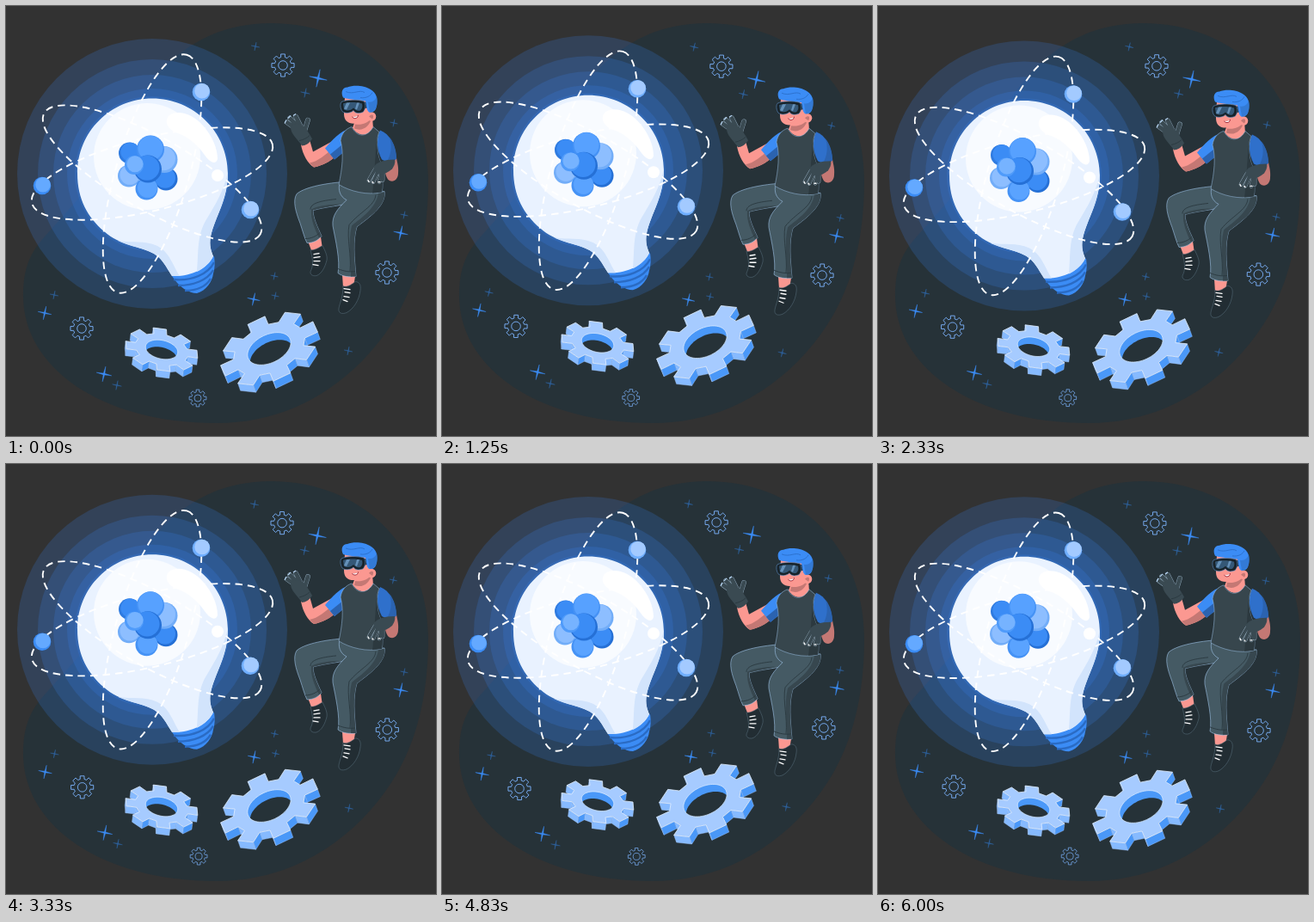
Recreate the animation shown at these times as an HTML page. Size 500x500 px, loop 6.04 s.

```html
<!DOCTYPE html>
<html lang="en">
<head>
<meta charset="utf-8">
<title>Floating idea</title>
<style>
  html, body { margin: 0; width: 100%; height: 100%; overflow: hidden; background: #323232; }
  svg { display: block; width: 100%; height: 100%; }
  .halo { fill: #3a84ee; fill-opacity: .2; }
  .orbits { fill: none; stroke: #fff; stroke-width: 1.9; stroke-dasharray: 8.5 6; }
  .glove { fill: #3a4a52; }
  .vest { fill: #37464d; stroke: #9fc4ea; stroke-width: .5; }
  .shoe { fill: #222d33; stroke: #5d7482; stroke-width: .5; }
  .finger { fill: none; stroke-linecap: round; stroke-linejoin: round; }
  .pants { fill: #455a64; stroke: #9fc4ea; stroke-width: .6; }
  .shade { fill: #37474f; }
  .skin { fill: #fb9891; }
  .tan { fill: #c47874; }
  .blue { fill: #3b8cf5; }
  .deep { fill: #2b63b0; }
  .line { fill: none; stroke: #2b3940; stroke-width: .9; }
  .lace { fill: none; stroke: #fff; stroke-width: 1.3; stroke-linecap: round; }
</style>
</head>
<body>
<svg viewBox="0 0 500 500">
  <path fill="#263238" d="M308 20C415 20 491 98 491 202C491 304 460 366 414 413C367 460 310 485 245 485C110 485 20 420 20 337C20 302 30 285 45 268C75 235 95 215 120 170C150 105 200 20 308 20Z"/>
  <g id="icons"></g>

  <g id="bulb">
    <g class="halo">
      <circle cx="170" cy="195" r="157"/><circle cx="170" cy="195" r="133"/>
      <circle cx="170" cy="195" r="115"/><circle cx="170" cy="195" r="99"/>
      <circle cx="170" cy="195" r="90"/>
    </g>
    <path class="blue" d="M193 314L242 291C243 298 243 305 241 311C240 320 233 331 222 334C213 334 201 327 193 314Z"/>
    <g fill="none" stroke="#2a6bc4" stroke-width="2.4">
      <path d="M195 318C216 320 235 312 242 298"/><path d="M200 325C218 325 234 319 241 307"/>
      <path d="M208 331C220 331 232 327 238 317"/>
    </g>
    <path fill="#e9f2ff" d="M170 107.5C218 107.5 258 146 258 195C258 226 243 245 238 268C236 279 239 286 241 291C234 306 214 315 193 314C186 303 182 294 172 288C156 279 133 279 114 262C95 246 83 224 83 195C83 146 122 107.5 170 107.5Z"/>
    <path fill="#d2e4fc" d="M258 192C258 226 243 245 238 268C236 279 239 286 241 291C237 299 230 305 222 309C224 285 222 268 232 250C244 230 254 214 258 192Z"/>
    <path fill="#d2e4fc" d="M130 273C148 276 160 272 176 279C190 286 193 300 202 314L193 314C186 303 182 294 172 288C160 281 144 280 130 273Z"/>
    <circle cx="164" cy="175" r="62" fill="#f8fbff"/>
    <path fill="#fff" d="M190 127C200 120 218 126 229 139C240 151 246 166 246 178C244 185 238 182 233 176C226 166 215 153 200 148C188 144 183 134 190 127Z"/>
    <circle cx="246" cy="197" r="7" fill="#fff"/>
    <g class="orbits">
      <ellipse cx="170" cy="195" rx="144" ry="42.5" transform="rotate(-73.8 170 195)"/>
      <ellipse cx="170" cy="195" rx="144" ry="42.5" transform="rotate(29.3 170 195)"/>
      <ellipse cx="170" cy="195" rx="144" ry="42.5" transform="rotate(-13.8 170 195)"/>
    </g>
    <g id="balls"></g>
  </g>

  <g id="gears"></g>

  <g id="man">
    <!-- far leg -->
    <path class="skin" d="M351 274L366 269L368 283L356 287Z"/>
    <path class="shoe" d="M354 284C359 285 364 281 368 279C371 285 374 291 373 296C371 304 367 312 361 314C356 315 352 312 355 307C358 300 356 292 354 284Z"/>
    <path class="lace" d="M358 289L364 288M358 293L365 292M358 297L365 297M357 301L363 302"/>
    <path class="pants" d="M392 205C367 207 346 212 338 219C333 227 337 240 342 253C345 262 347 270 350 276C357 276 363 273 367 268C362 257 357 247 357 238C372 234 390 232 408 229Z"/>
    <path class="shade" d="M390 231C378 231 364 232 355 237C354 248 359 260 364 270L367 268C362 257 357 247 357 238C368 235 378 234 390 231Z"/>
    <path class="line" d="M348 271C355 271 361 268 365 264M354 237C354 230 365 227 384 225"/>
    <!-- near leg -->
    <path class="skin" d="M391 313L406 315L404 327L392 328Z"/>
    <path class="shoe" d="M392 326C397 328 402 324 406 321C411 321 413 325 412 331C411 342 404 353 396 357C391 359 386 358 387 352C388 346 392 339 392 326Z"/>
    <path class="lace" d="M393 329L400 330M394 333L400 334M393 338L399 339M392 342L397 344"/>
    <path class="pants" d="M388 206C402 217 424 218 440 216C442 231 427 243 408 257C403 273 405 293 407 315C399 316 391 315 386 311C389 297 383 272 380 256C379 244 385 237 396 226C388 222 386 214 388 206Z"/>
    <path class="shade" d="M440 217C442 231 427 243 408 257C403 273 405 293 407 315L401 315C402 296 397 276 402 256C414 246 430 236 433 218Z"/>
    <path class="line" d="M386 306C393 309 400 310 406 309M430 220C429 233 411 240 399 255C396 271 402 290 400 309"/>

    <!-- arm on the left -->
    <path class="skin" d="M379 158L357 170L353 156L343 162C345 173 351 184 358 188C368 186 376 182 385 174Z"/>
    <path class="tan" d="M353 183C363 181 371 174 380 166L385 174C376 182 368 186 358 188Z"/>
    <path class="blue" d="M400 143C388 146 379 157 371 166L382 179L393 170Z"/>
    <path class="deep" d="M393 160L377 173L382 179L393 170Z"/>
    <g class="finger" stroke="#8fa8bb" stroke-width="5.6">
      <path d="M337 143L327 136M339 140L330 131M343 141L337 129M347 146L351 133"/>
    </g>
    <g class="finger" stroke="#3a4a52" stroke-width="4.8">
      <path d="M337 143L327 136M339 140L330 131M343 141L337 129M347 146L351 133"/>
    </g>
    <path class="glove" d="M331 140C337 135 343 137 348 142C352 148 354 151 356 155C353 160 348 163 344 163C340 156 330 149 331 140Z"/>
    <path class="line" d="M341 157C346 156 350 154 353 151"/>
    <path fill="none" stroke="#b5d2ef" stroke-width="1.3" d="M324 137L326 133M328 131L331 128M334 128L337 126"/>

    <!-- torso -->
    <path class="tan" d="M441 178C440 187 440 196 444 202C449 207 456 203 456 195C457 187 454 180 454 176Z"/>
    <path fill="#2f70cb" d="M435 145C446 149 453 162 454 178C449 183 442 182 437 179C431 168 430 155 435 145Z"/>
    <path class="deep" d="M446 153C452 161 454 170 454 178C451 182 447 182 443 181C448 173 449 163 446 153Z"/>
    <path class="skin" d="M406 134L426 130L427 143C422 152 409 153 403 142Z"/>
    <path class="tan" d="M425 131C420 137 414 139 406 138L405 143C415 147 423 140 425 131Z"/>
    <path class="vest" d="M402 141C395 143 390 149 389 157C393 172 391 189 387 208C400 216 420 221 437 217C440 204 435 193 435 181C430 169 431 153 434 147L427 141C421 152 409 155 402 141Z"/>
    <path fill="#2c393f" d="M434 147C428 162 431 180 427 198C427 207 427 214 426 218L437 217C440 204 435 193 435 181C430 169 431 153 434 147Z"/>
    <!-- hand on the right -->
    <g class="finger" stroke="#9fb6c8" stroke-width="4.6">
      <path d="M430 189L422 203M433 191L427 205M437 192L434 205M438 189L438 203"/>
    </g>
    <g class="finger" stroke="#3a4a52" stroke-width="3.9">
      <path d="M430 189L422 203M433 191L427 205M437 192L434 205M438 189L438 203"/>
    </g>
    <path class="glove" d="M427 188C431 182 440 179 452 179C453 183 451 187 449 190C443 195 436 198 431 195Z"/>
    <path class="lace" d="M421 203L422 205M426 205L427 206M433 205L435 205"/>

    <!-- head -->
    <path class="skin" d="M394 106L421 106L425 128C422 134 415 138 407 137C398 138 393 134 393 126Z"/>
    <circle class="skin" cx="425" cy="129" r="5.3"/>
    <path class="tan" d="M422 129C425 125 429 127 426 132Z"/>
    <path fill="#1c262b" d="M412 111L422 113L422 118L414 121Z"/>
    <path class="blue" d="M392 107C389 101 391 95 397 95C404 92 417 93 423 97C431 101 433 109 431 117C430 122 427 125 422 124C419 121 419 116 418 111C410 109 401 110 392 107Z"/>
    <path class="deep" d="M421 112C426 113 430 110 431 105C433 112 432 123 423 124Z" opacity=".45"/>
    <path fill="none" stroke="#2a6bc4" stroke-width=".8" d="M395 100C404 104 411 97 417 101M412 107C419 108 424 105 426 101"/>
    <path fill="#18232a" stroke="#5f8fc4" stroke-width=".6" d="M390 112C396 109 408 109 416 111C419 115 418 121 415 124C409 126 406 125 404 122C401 125 395 126 391 123C389 120 388 115 390 112Z"/>
    <path fill="#355877" d="M392 114C398 112 407 112 414 114C415 118 414 120 412 122C408 123 406 121 404 119C401 122 397 123 393 121Z"/>
    <path fill="#7ba9d6" d="M396 113L400 113L396 121L393 120ZM408 113L411 113L408 121L406 120Z" opacity=".7"/>
    <path fill="#a52f3d" d="M402 129C405 130 408 129 410 127C410 131 405 134 402 129Z"/>
    <path fill="#fff" d="M403 129C405 130 407 129 409 128L408 130C406 131 404 131 403 129Z"/>
  </g>
</svg>
<script>
const LOOP = 6040, TAU = Math.PI * 2;
const byId = id => document.getElementById(id);

function add(parent, tag, attrs) {
  const node = document.createElementNS('http://www.w3.org/2000/svg', tag);
  for (const key in attrs) node.setAttribute(key, attrs[key]);
  return parent.appendChild(node);
}

// Point on a plane spanned by u and v around c, at radius r and angle deg
function spot(c, u, v, r, deg) {
  const a = deg * TAU / 360, x = r * Math.cos(a), y = r * Math.sin(a);
  return [c[0] + x * u[0] + y * v[0], c[1] + x * u[1] + y * v[1]];
}

const outline = pts => 'M' + pts.map(p => p.map(n => n.toFixed(2)).join(' ')).join('L') + 'Z';

function cog(c, u, v) {
  const pts = [];
  for (let k = 0; k < 8; k++)
    for (const [r, off] of [[.79, -14], [1.08, -10.5], [1.08, 10.5], [.79, 14]])
      pts.push(spot(c, u, v, r, k * 45 + off));
  return pts;
}

function solidGear(name, c, u, v, depth) {
  const g = byId('gears');
  const shift = p => [p[0] + depth[0], p[1] + depth[1]];
  const rim = cog(c, u, v), hole = [];
  for (let a = 0; a < 360; a += 6) hole.push(spot(c, u, v, .48, a));

  const sides = [];
  rim.forEach((p, i) => {
    const q = rim[(i + 1) % rim.length];
    const nx = p[1] - q[1], ny = q[0] - p[0];
    if (nx * depth[0] + ny * depth[1] > 0)
      sides.push({ y: p[1] + q[1], right: nx > .25 * Math.hypot(nx, ny), d: outline([p, q, shift(q), shift(p)]) });
  });
  sides.sort((a, b) => a.y - b.y);
  for (const s of sides)
    add(g, 'path', { d: s.d, fill: s.right ? '#4a98f8' : '#86baff', stroke: '#a6cbff', 'stroke-width': .4 });

  const holePath = outline(hole);
  add(g, 'path', { d: outline(rim), fill: '#a6cbff', stroke: '#e3efff', 'stroke-width': .8 });
  const clip = add(g, 'clipPath', { id: name });
  add(clip, 'path', { d: holePath });
  add(g, 'path', { d: holePath, fill: '#4a98f8' });
  add(g, 'path', { d: outline(hole.map(shift)), fill: '#263238', 'clip-path': `url(#${name})` });
  add(g, 'path', { d: holePath, fill: 'none', stroke: '#e3efff', 'stroke-width': .7 });
}

solidGear('holeA', [181, 399.5], [39, 5], [-2, -23], [-1, 8]);
solidGear('holeB', [306, 398.5], [50.5, -24], [-14, -31], [3, 8.5]);

function iconGear(x, y, r) {
  const style = { fill: 'none', stroke: '#79aef5', 'stroke-width': r > 11 ? .95 : .75 };
  add(byId('icons'), 'path', { d: outline(cog([x, y], [r, 0], [0, -r])), ...style });
  add(byId('icons'), 'circle', { cx: x, cy: y, r: r * .43, ...style });
}

// Thin four-armed sparkle
function star(x, y, r, fill) {
  const pts = [];
  for (let k = 0; k < 4; k++)
    pts.push(spot([x, y], [1, 0], [0, 1], r, k * 90 + 12), spot([x, y], [1, 0], [0, 1], r * .13, k * 90 + 57));
  add(byId('icons'), 'path', { d: outline(pts), fill, stroke: fill, 'stroke-width': .4 });
}

[[322, 69, 12.3], [88, 375, 12.3], [443, 310, 12.3], [223, 456, 9.3]].forEach(a => iconGear(...a));
[[363, 84, 10.5], [45, 357, 8], [114, 428, 9], [459, 264, 8.5], [288, 341, 7.5]].forEach(a => star(...a, '#3b8cf5'));
[[290, 47, 5], [348, 101, 5.5], [451, 136, 4.5], [463, 243, 4.5], [312, 314, 4.5], [313, 337, 4.5],
 [398, 401, 5], [56, 336, 5], [129, 441, 5.5]].forEach(a => star(...a, '#2f639f'));

// Ball with a darker crescent along its lower edge
function ball(x, y, r, fill, edge, dx = 1) {
  add(byId('balls'), 'circle', { cx: x, cy: y, r, fill: edge });
  add(byId('balls'), 'circle', { cx: x + dx, cy: y - 1.2, r: r - 1.5, fill });
}

ball(143.5, 171, 12.5, '#3b8cf5', '#2f7be0');
ball(186, 201, 13.5, '#3b8cf5', '#2570d6', -1);
ball(184, 178.5, 15.5, '#8dbeff', '#72adf8', -1);
ball(143, 197.5, 13, '#8dbeff', '#72adf8');
ball(163.5, 212.5, 13, '#5aa3ff', '#4592f5');
ball(168, 166.5, 16, '#57a1ff', '#4592f5', 0);
ball(165, 189.5, 16, '#3b8cf5', '#2570d6', -1);
ball(149, 185, 11, '#76b3ff', '#4f9bfa');
ball(227, 100, 10.3, '#a3caff', '#6faeff');
ball(42, 209, 10.3, '#64a9ff', '#3b8cf5');
ball(284, 237, 10.3, '#a3caff', '#6faeff');

// Up-and-down drift, two swings per loop; highest at phase `top`
const drift = (t, mid, swing, top) => mid - swing * Math.cos(TAU * (2 * t / LOOP - top));
const lift = (id, y) => byId(id).setAttribute('transform', `translate(0 ${y.toFixed(3)})`);

const start = performance.now();
function draw() {
  const t = (performance.now() - start) % LOOP;
  lift('bulb', drift(t, -1.1, 3.6, .3));
  lift('man', drift(t, 1.4, 3.8, .17));
  lift('gears', drift(t, -4.1, 4.1, .49));
  byId('icons').setAttribute('transform', `rotate(${(.95 * Math.sin(TAU * t / LOOP)).toFixed(4)} 250 250)`);
  requestAnimationFrame(draw);
}
draw();
</script>
</body>
</html>
```
